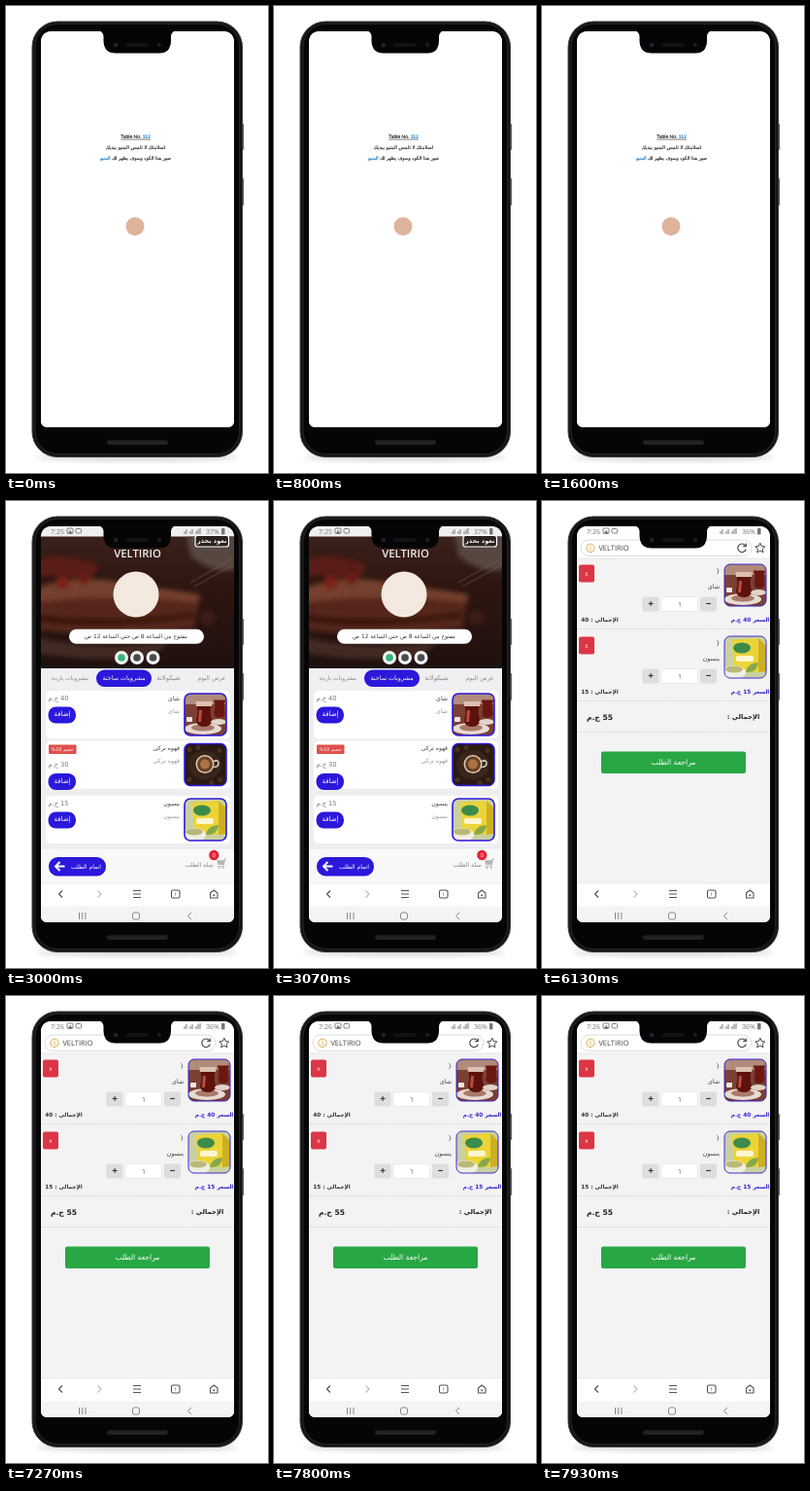
Animation of 270x480 px, one loop 8000 ms. Source, as an HTML page:

```html
<!DOCTYPE html>
<html lang="ar">
<head>
<meta charset="utf-8">
<title>Table menu</title>
<style>
html, body { margin: 0; width: 100%; height: 100%; overflow: hidden; background: #fff; }
svg { display: block; width: 100%; height: 100%; }
text { text-anchor: middle; text-rendering: geometricPrecision; white-space: pre; }
.ar { font-family: "DejaVu Sans", sans-serif; direction: rtl; }
.right { text-anchor: start; }
.la { font-family: "Open Sans", "Noto Sans", sans-serif; }
.note text { stroke: currentColor; stroke-width: .15; }
</style>
</head>
<body>
<svg id="stage" viewBox="0 0 270 480">
  <defs>
    <clipPath id="screen"><path d="M36 433V38Q36 26 48 26H223Q235 26 235 38V426Q235 433 228 433H43Q36 433 36 426Z"/></clipPath>
    <clipPath id="thumb"><rect width="43" height="43" rx="6"/></clipPath>
    <clipPath id="heroBox"><rect x="36" y="36.5" width="199" height="136"/></clipPath>
    <linearGradient id="heroTone" x2="0" y2="1">
      <stop offset="0" stop-color="#3b211b"/>
      <stop offset=".35" stop-color="#2f1611"/>
      <stop offset="1" stop-color="#1f110e"/>
    </linearGradient>
    <filter id="soft" x="-30%" y="-30%" width="160%" height="160%"><feGaussianBlur stdDeviation="2.5"/></filter>
  </defs>
</svg>
<script>
const LOOP = 8000;
const BLUE = '#2b18db', NAME = 'VELTIRIO';
const svg = document.getElementById('stage');

const rect = (x, y, w, h, fill, r = 0, more = '') =>
  `<rect x="${x}" y="${y}" width="${w}" height="${h}" rx="${r}" fill="${fill}" ${more}/>`;
const dot = (x, y, r, fill, more = '') =>
  `<circle cx="${x}" cy="${y}" r="${r}" fill="${fill}" ${more}/>`;
const oval = (x, y, rx, ry, fill) =>
  `<ellipse cx="${x}" cy="${y}" rx="${rx}" ry="${ry}" fill="${fill}"/>`;
const line = (d, color, w = 1, more = '') =>
  `<path d="${d}" fill="none" stroke="${color}" stroke-width="${w}" ${more}/>`;
const shape = (d, fill) => `<path d="${d}" fill="${fill}"/>`;
// x and y give the middle of the line of text, or its right end with side 'right'
const ar = (s, x, y, size, fill, weight = 400, side = '') =>
  `<text class="ar ${side}" x="${x}" y="${y + size * .27}" font-size="${size}" fill="${fill}" font-weight="${weight}">${s}</text>`;
const la = (s, x, y, size, fill, weight = 400) =>
  `<text class="la" x="${x}" y="${y + size * .36}" font-size="${size}" fill="${fill}" font-weight="${weight}">${s}</text>`;

const glass = 'M11 8H29Q25 18 28 27Q28 34 20 34T12 27Q15 18 11 8Z';
const photos = {
  tea: rect(0, 0, 43, 43, '#7a4034') + rect(0, 0, 43, 11, '#b08a7a') +
    `<g transform="translate(22 1) scale(.7)">${shape(glass, '#6b1711')}</g>` +
    oval(19, 36, 19, 6, '#e6dcd4') + oval(19, 35, 12, 3.5, '#a9796a') +
    shape(glass, '#5d120d') + shape('M11 8H29L28 13H12Z', '#dcc0b2') +
    shape('M15 17H18L17 29H14Z', '#b5503d') +
    oval(35, 29, 8, 3, '#e2d5cb') + rect(2, 24, 6, 5, '#efe6df', 1),
  coffee: rect(0, 0, 43, 43, '#2a1a14') + oval(21, 22, 17, 15, '#3a251a') +
    dot(21, 21, 9.5, '#d9cdbd') + dot(21, 21, 8, '#6b4023') + dot(21, 21, 5, '#a87445') +
    line('M30 18Q35 16 35 20T30 24', '#d9cdbd', 1.6) +
    [[5, 6], [36, 7], [5, 37], [37, 37], [14, 4], [28, 40]].map(p => dot(...p, 2.5, '#4a2f21')).join(''),
  anise: rect(0, 0, 43, 43, '#c9d0a2') + shape('M8 4L35 2L43 10V36L10 38Z', '#ecd437') +
    shape('M35 2L43 10V36L35 37Z', '#cdb022') + oval(18, 12, 9, 5.5, '#3c8b4b') +
    rect(12, 20, 18, 6, '#fdf6cf', 2) + shape('M22 37Q24 27 35 27Q34 38 22 37Z', '#86a84a') +
    oval(10, 37, 12, 7, '#f1efe0') + oval(10, 34, 9, 3.5, '#b9b878')
};
const photo = (kind, x, y, border) =>
  `<g transform="translate(${x} ${y})"><g clip-path="url(#thumb)">${photos[kind]}</g>` +
  rect(0, 0, 43, 43, 'none', 6, `stroke="${BLUE}" stroke-width="${border}"`) + '</g>';

function status(time, power) {
  const c = '#777';
  return la(time, 53, 31, 7, c) +
    rect(63, 28, 6, 5.5, 'none', 1, `stroke="${c}" stroke-width=".9"`) +
    shape('M64 33L66 30L68.5 33Z', c) +
    rect(72, 28.5, 5.5, 4.5, 'none', 1, `stroke="${c}" stroke-width=".9"`) +
    line('M184 34V31M186 34V29M190 34V31M192 34V29M196 34V31M198 34V29M200 34V28', c, 1) +
    la(power, 213, 31, 7, c) + rect(222, 28, 3.5, 6.5, c, .8);
}

function browserBar() {
  const c = '#555';
  return rect(36, 393, 199, 24, '#fff') + rect(36, 416.5, 199, 17, '#f4f4f4') +
    line('M36 393H235', '#e2e2e2', .7) +
    line('M58 400.5L54.5 404L58 407.5', c, 1.2) +
    line('M94.5 400.5L98 404L94.5 407.5', '#bbb', 1.1) +
    line('M131 400.5H139M131 404H139M131 407.5H139', c, 1.2) +
    rect(170.5, 400, 8.5, 8, 'none', 1.5, `stroke="${c}" stroke-width="1.1"`) +
    la('1', 174.8, 404, 5, c) +
    line('M210.5 403V408H218V403L214.2 400Z', c, 1.1, 'stroke-linejoin="round"') +
    dot(214.2, 405.3, 1, c) +
    line('M75.5 423V430M78.7 423V430M82 423V430', '#888', 1) +
    rect(130.5, 423, 7, 7, 'none', 2, 'stroke="#888" stroke-width="1"') +
    line('M191 423L187.5 426.5L191 430', '#888', 1);
}

function codePage() {
  return rect(36, 24, 199, 409, '#fff') + '<g class="note" color="#222">' +
    '<text x="133.5" y="136" font-size="5" font-family="Liberation Sans, sans-serif" fill="#222">' +
    'Table No. <tspan fill="#1673b8" color="#1673b8">112</tspan></text>' +
    line('M118 137.2H149', '#333', .6) +
    ar('لسلامتك لا تلمس المنيو بيديك', 133.5, 146, 5, '#222') +
    ar('صور هذا الكود وسوف يظهر لك <tspan fill="#1673b8" color="#1673b8">المنيو</tspan>', 133.5, 157, 4.7, '#222') +
    '</g>' + dot(133, 226.5, 9.5, '#dfb49c');
}

function hero() {
  return '<g clip-path="url(#heroBox)">' + rect(36, 36, 199, 137, 'url(#heroTone)') +
    '<g filter="url(#soft)">' +
    shape('M186 34H240V70Q212 76 190 56Z', '#564640') +
    shape('M30 60Q60 52 96 66L84 84Q58 72 30 78Z', '#5a1c14') +
    shape('M30 94Q70 76 122 86L200 98L194 130Q110 142 30 132Z', '#56261a') +
    shape('M30 90Q70 74 122 84L200 96L198 104Q110 94 30 104Z', '#74402e') +
    shape('M30 116Q100 126 194 114V120Q100 134 30 124Z', '#3a170f') +
    shape('M30 140Q100 156 170 144L150 160Q90 166 30 156Z', '#432c24') +
    dot(58, 84, 7, '#7d2018') + dot(80, 80, 6, '#6c1b14') + dot(208, 120, 8, '#3d1a14') +
    '</g>' + line('M190 84L232 60M194 88L234 66', '#7a6a62', 1, 'opacity=".5"') + '</g>';
}

function item(y, kind, name, price, dy, discount) {
  return rect(41, y - 3, 190, 49, '#fff', 5) + photo(kind, 184, y, 1.6) +
    ar(name, 179, y + 5, 6.2, '#444', 400, 'right') +
    ar(name, 179, y + 18, 6.2, '#999', 400, 'right') +
    (discount ? rect(44, y + 1, 28.5, 9.5, '#e0504c', 1) + ar(discount, 58, y + 5.7, 4.9, '#fff') : '') +
    ar(price + ' ج.م', 54, y + 5 + dy, 6.7, '#777') +
    rect(43.5, y + 13.5 + dy, 28.5, 17, BLUE, 8) + ar('إضافة', 58, y + 21.5 + dy, 7, '#fff');
}

function menuPage() {
  const badges = [[119, '#32b77a'], [135, '#4a4a4a'], [151.5, '#4a4a4a']];
  return rect(36, 24, 199, 409, '#efeff2') + hero() + status('7:25', '37%') +
    rect(195, 35.5, 34.5, 11.5, '#2b211d', 2.5, 'stroke="#fff" stroke-width="1.2"') +
    ar('نعود بحذر', 212.2, 40.8, 6.5, '#fff', 700) +
    la(NAME, 135.5, 54, 11.3, '#eee', 600) +
    dot(134, 96, 23.5, '#f3e9df') +
    rect(65, 131.7, 139, 15, '#fff', 7.5) +
    ar('مفتوح من الساعة 8 ص حتي الساعة 12 ص', 134, 139, 5.8, '#333') +
    badges.map(([x, c]) => dot(x, 161, 7, '#f4f4f4') + dot(x, 161, 3.8, c)).join('') +
    rect(36, 172, 199, 20.5, '#f0f0f3') + rect(93, 173.5, 57, 17.5, BLUE, 8.7) +
    ar('عرض اليوم', 212, 182.5, 6.2, '#888') + ar('شيكولاتة', 167.5, 182.5, 6.8, '#888') +
    ar('مشروبات ساخنة', 121.5, 182.5, 6.4, '#fff') + ar('مشروبات باردة', 66, 182.5, 6, '#888') +
    item(198, 'tea', 'شاى', '40', 0) +
    item(249.5, 'coffee', 'قهوه تركى', '30', 17, 'خصم 10%') +
    item(306, 'anise', 'ينسون', '15', 0) +
    rect(36, 357, 199, 36, '#f8f8f9') + line('M36 357H235', '#e1e1e5', .7) +
    rect(44, 366, 59, 19.5, BLUE, 9.5) +
    line('M60.5 375.5H51.5M55.5 371L51 375.5L55.5 380', '#fff', 2) +
    ar('اتمام الطلب', 82.5, 376, 6.1, '#fff') +
    ar('سلة الطلب', 199, 374, 6.2, '#888') +
    shape('M227 367.5H225L224.4 369.3H217L218.5 374H224L223.7 375H218V375.8H224.5L226 368.5H227Z', '#b5b5b5') +
    dot(219.5, 377, 1, '#b5b5b5') + dot(223.8, 377, 1, '#b5b5b5') +
    dot(214.3, 364, 5.2, '#e32636') + la('0', 214.3, 364, 5.5, '#fff') + browserBar();
}

function orderRow(y, kind, name, price) {
  const box = (x, s) => rect(x, y + 33, 17, 15, '#dedee0', 2) + la(s, x + 8.5, y + 40.3, 10, '#333', 700);
  return rect(38, y, 16, 18, '#dc3545', 2) + la('x', 46, y + 9, 6.5, '#fff') +
    photo(kind, 188, y - .5, .9) + la(')', 181, y + 6, 7, '#444') +
    ar(name, 183, y + 23, 6.4, '#444', 400, 'right') +
    box(103.5, '+') + box(163, '−') +
    rect(123, y + 33, 37.5, 15, '#fff', 2, 'stroke="#e2e2e4" stroke-width=".7"') +
    la('1', 142, y + 40.5, 7, '#666') +
    ar('السعر ' + price + ' ج.م', 214.5, y + 57, 5.8, '#3527cc', 700) +
    ar('الإجمالي : ' + price, 59.5, y + 57, 5.7, '#333', 700) +
    line(`M36 ${y + 66}H235`, '#cfcfd2', .8, 'stroke-dasharray="1 1"');
}

function cartPage() {
  return rect(36, 24, 199, 409, '#f3f3f4') + rect(36, 24, 199, 35, '#fff') +
    status('7:26', '36%') +
    rect(40, 40, 176, 16.5, '#fff', 8.2, 'stroke="#d8d8d8" stroke-width=".9"') +
    dot(50, 48.3, 4.2, '#fff', 'stroke="#e0a84d" stroke-width="1"') +
    dot(50, 46.5, .7, '#e0a84d') + line('M50 48V50.5', '#e0a84d', 1) +
    la(NAME, 74, 48.5, 7.5, '#444') +
    line('M209.6 45.8A4.3 4.3 0 1 0 210.2 49.5M210.3 43.5V46.5H207.2', '#444', 1.1) +
    line('M224.8 43.2L226.3 46.5L229.8 46.9L227.2 49.3L227.9 52.8L224.8 51L221.7 52.8L222.4 49.3L219.8 46.9L223.3 46.5Z',
      '#444', 1, 'stroke-linejoin="round"') +
    line('M36 59H235', '#dddddf', .7) +
    orderRow(65.5, 'tea', 'شاى', '40') + orderRow(139.5, 'anise', 'ينسون', '15') +
    ar('الإجمالي :', 207.5, 222.5, 6.7, '#222', 700) +
    ar('55 ج.م', 59.5, 222.5, 7.6, '#222', 700) +
    line('M36 237.5H235', '#cfcfd2', .8, 'stroke-dasharray="1 1"') +
    rect(61, 257.5, 149, 22.5, '#28a745', 2) + ar('مراجعة الطلب', 135.5, 268.5, 7.6, '#fff') + browserBar();
}

const body = `<g filter="url(#soft)">${oval(135, 464, 104, 4, '#d9d9d9')}</g>` +
  rect(243, 121, 1.8, 27, '#333', .8) + rect(243, 177, 1.8, 28, '#333', .8) +
  rect(27, 16, 216.5, 447.5, '#151515', 26, 'stroke="#3a3a3a" stroke-width="1"') +
  rect(30, 18.5, 210.5, 442, '#050505', 23.5, 'stroke="#2c2c2c" stroke-width=".8"') +
  rect(104, 446.3, 63, 4.6, '#222', 2.3);
const notch = shape('M96 25.5Q100 26.5 100.5 31V36Q101 48.5 113 48.5H158Q169.5 48.5 170 36V31Q170.5 26.5 174.5 25.5Z', '#050505') +
  dot(113, 40, 2.6, '#15161c') + dot(113, 40, 1, '#2b2f66') +
  dot(158, 40, 2.4, '#15161c') + dot(158, 40, .8, '#30333a') +
  rect(123, 38, 24, 4, '#121212', 2);

const pages = [[codePage, 0, 3000], [menuPage, 3000, 6000], [cartPage, 6000, LOOP]];
svg.insertAdjacentHTML('beforeend', body + '<g clip-path="url(#screen)">' + rect(36, 24, 199, 409, '#fff') +
  pages.map(([draw]) => `<g class="page">${draw().replace('fill="#efeff2"', 'fill="#efeff2" y="36.5"')}</g>`).join('') +
  '</g>' + notch);

const groups = document.querySelectorAll('.page');
const start = performance.now();
function tick() {
  const t = Math.max(0, performance.now() - start) % LOOP;
  pages.forEach(([, from, to], i) => { groups[i].style.display = t >= from && t < to ? '' : 'none'; });
  requestAnimationFrame(tick);
}
tick();
</script>
</body>
</html>
```
